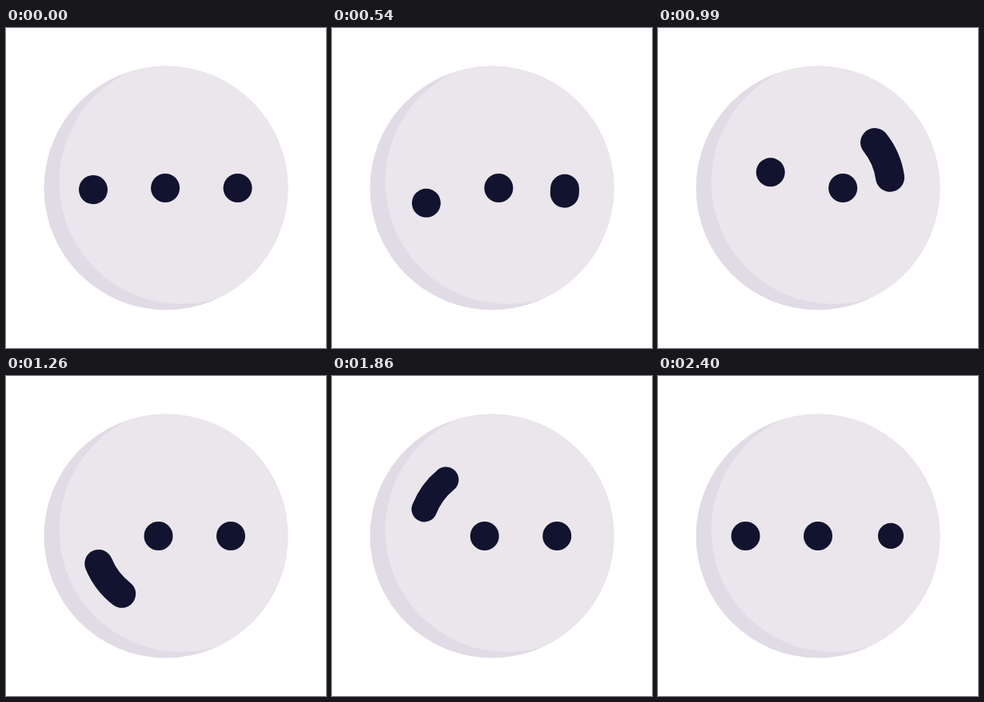
These frames come from a looping animation (400x400 px, 4.46 s). An HTML page:

```html
<!DOCTYPE html>
<html lang="en">
<head>
<meta charset="utf-8">
<title>Three dots</title>
<style>
  html, body { margin: 0; width: 100%; height: 100%; overflow: hidden; background: #fff; }
  svg { display: block; width: 100vw; height: 100vh; }
</style>
</head>
<body>
<svg viewBox="0 0 400 400">
  <clipPath id="disc"><circle cx="200" cy="200" r="152.5"/></clipPath>
  <circle cx="200" cy="200" r="152.5" fill="#e0dbe5"/>
  <circle cx="218.9" cy="192.6" r="152.4" fill="#eae6ec" clip-path="url(#disc)"/>
  <g fill="#11132f">
    <circle id="left" r="18"/>
    <circle id="right" cy="200" r="18"/>
  </g>
  <path id="arc" fill="none" stroke="#11132f" stroke-linecap="round"/>
</svg>
<script>
const LOOP = 4460, STEP = 30, MOVE = 2400, TURN = 600;
const MID = 200, ORBIT = 91, GAP = 90.5;

// Each turn: side of the arc (1 = below), dot radius, and the left dot's hop.
const turns = [
  { side: 1, r: 18, hop: 61, from: 0.5, peak: 0.75 },
  { side: -1, r: 18, hop: -111, from: 0.57, peak: 0.89 },
  { side: 1, r: 17.5, hop: 44, from: 0.5, peak: 0.75 },
  { side: -1, r: 16, hop: 0, from: 0.5, peak: 0.75 }
];

const left = document.getElementById("left");
const right = document.getElementById("right");
const arc = document.getElementById("arc");

const clamp = v => Math.min(1, Math.max(0, v));
const smooth = v => { v = clamp(v); return v * v * (3 - 2 * v); };

// Bezier ease with flat ends; x1 and x2 are the handles' time values.
function ease(x, x1, x2) {
  let lo = 0, hi = 1;
  for (let i = 0; i < 24; i++) {
    const t = (lo + hi) / 2, u = 1 - t;
    if (3 * u * u * t * x1 + 3 * u * t * t * x2 + t * t * t < x) lo = t;
    else hi = t;
  }
  return smooth(lo);
}

function orbitPoint(q, side) {
  const a = Math.PI * (1 - q);
  const x = MID + ORBIT * Math.cos(a), y = MID + side * ORBIT * Math.sin(a);
  return x.toFixed(2) + " " + y.toFixed(2);
}

function draw(ms) {
  const t = Math.min(MOVE, Math.floor(ms / STEP) * STEP);
  const time = t + 6 * (1 - t / MOVE);
  const index = Math.min(turns.length - 1, Math.floor(time / TURN));
  const p = time / TURN - index;
  const { side, r, hop, from, peak } = turns[index];

  const x = MID + GAP * (1 - p);
  const lift = p < peak ? (p - from) / (peak - from) : (1 - p) / (1 - peak);
  right.setAttribute("cx", x);
  left.setAttribute("cx", x - GAP);
  left.setAttribute("cy", MID + hop * smooth(lift));

  const tail = Math.min(0.999, ease(p, 0.04, 0.69));
  const head = Math.max(tail + 0.001, ease(p, 0.15, -0.03));
  arc.setAttribute("stroke-width", 2 * r);
  arc.setAttribute("d", `M${orbitPoint(tail, side)} A${ORBIT} ${ORBIT} 0 0 ${side > 0 ? 0 : 1} ${orbitPoint(head, side)}`);
}

const start = performance.now();
function tick() {
  draw((performance.now() - start) % LOOP);
  requestAnimationFrame(tick);
}
tick();
</script>
</body>
</html>
```
